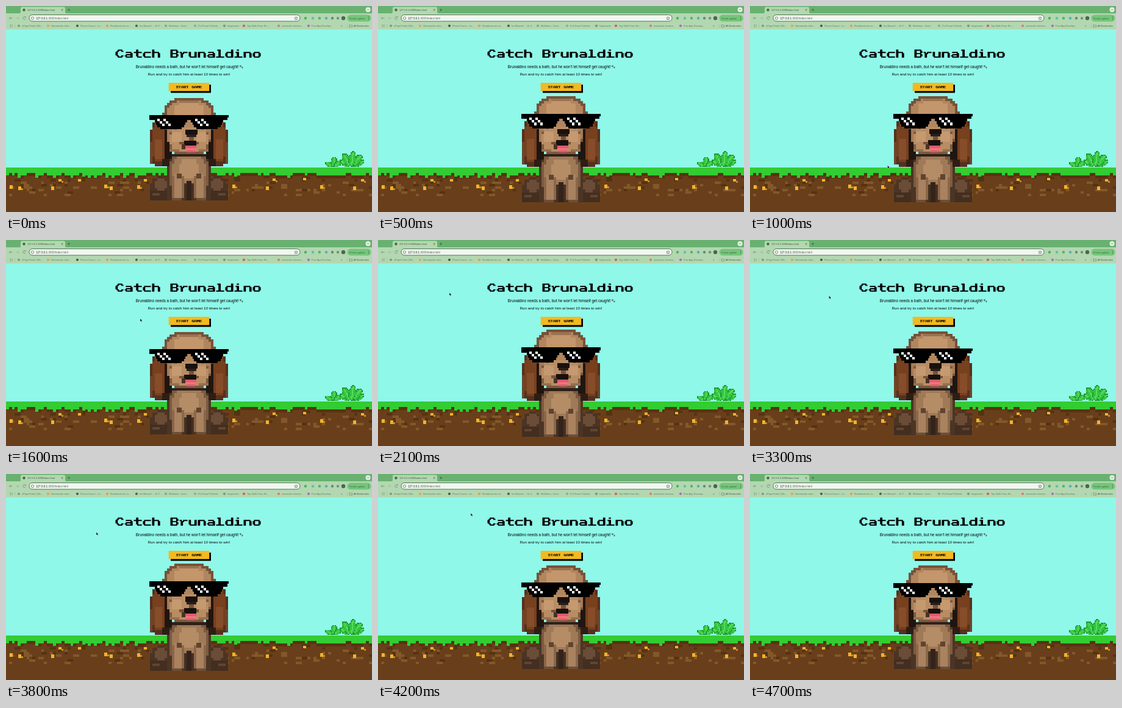
Write an HTML page that moves like this. It is 600 px wide and 338 px high and loops after 4800 ms.

```html
<!DOCTYPE html>
<html lang="en">
<head>
<meta charset="utf-8">
<title>Catch Brunaldino</title>
<style>
  html, body { margin: 0; width: 100%; height: 100%; overflow: hidden; background: #8ff8e9; }
  svg { display: block; width: 600px; height: 338px; }
  text { font-family: "Liberation Sans", Arial, sans-serif; }
  .px { shape-rendering: crispEdges; }
  .letters { fill: none; stroke: #000; stroke-width: 1; stroke-linecap: square; stroke-linejoin: miter; }
</style>
</head>
<body>
<svg id="stage" viewBox="0 0 600 338">
  <rect width="600" height="338" fill="#8ff8e9"/>

  <g id="chrome">
    <rect width="600" height="13" fill="#68b170"/>
    <rect y="12" width="600" height="26.5" fill="#b3d7b0"/>
    <path d="M21 12.5q3 0 3-3V4q0-2.5 2.5-2.5h68q2.5 0 2.5 2.5v5.5q0 3 3 3z" fill="#b3d7b0"/>
    <circle cx="29.5" cy="6.5" r="2.2" fill="#456b49"/>
    <text x="35" y="8" font-size="3.9" fill="#34503a">127.0.0.1:3000/index.html</text>
    <path d="M90.700 5l2.800 2.800m0-2.800l-2.800 2.800M101 6.400h4m-2-2v4" stroke="#29482b" stroke-width=".6"/>
    <circle cx="593.5" cy="6" r="4" fill="#e4f1e2"/>
    <path d="M592 5.300l1.500 1.500 1.500-1.500" fill="none" stroke="#2f4f33" stroke-width=".7"/>
    <g fill="none" stroke="#66886b" stroke-width=".7">
      <path d="M10.500 20H5.500m2-2l-2 2 2 2"/>
      <path d="M16 20h5m-2-2l2 2-2 2" stroke="#92b594"/>
      <path d="M32 18.500a2.300 2.300 0 1 0 .2 2.300M32.200 17v1.700h-1.700"/>
    </g>
    <rect x="38" y="14.500" width="444" height="10.500" rx="5.200" fill="#f0f7ee" stroke="#41694a" stroke-width=".9"/>
    <circle cx="43.500" cy="20" r="2.200" fill="none" stroke="#4d6550" stroke-width=".7"/>
    <text x="49" y="21.600" font-size="4.600" fill="#1b2b1c">127.0.0.1<tspan fill="#566b58">:3000/index.html</tspan></text>
    <path d="M475.500 17.500l.8 1.700 1.900.2-1.400 1.300.4 1.900-1.700-1-1.700 1 .4-1.900-1.400-1.300 1.900-.2z" fill="none" stroke="#364d38" stroke-width=".6"/>
    <rect x="559.500" y="14.500" width="39" height="11" rx="5.500" fill="#75c47b"/>
    <text x="563" y="21.500" font-size="4.200" fill="#2f7038">Finish update</text>
    <path d="M594.500 17.800v.1m0 2.100v.1m0 2.100v.1" stroke="#1e5427" stroke-linecap="round"/>
    <path d="M6.500 30.500h1.500v1.500h-1.500zm2.500 0h1.500v1.500h-1.500zm-2.500 2.500h1.500v1.500h-1.500zm2.500 0h1.500v1.500h-1.500z" fill="#7d9f80"/>
    <path d="M14.500 29.500v6M559.500 29.500v6" stroke="#8fb891" stroke-width=".5"/>
    <text x="549" y="34" font-size="5" fill="#5c7c60">»</text>
    <text x="570" y="34" font-size="3.900" fill="#3c5a41">All Bookmarks</text>
    <path d="M563 30.800h1.800l.7.8h2.300v3H563z" fill="none" stroke="#5c7c60" stroke-width=".6"/>
  </g>

  <g id="ground" class="px"></g>
  <g id="bushes" class="px"></g>

  <text x="300" y="84" font-size="15" text-anchor="middle" fill="none">Catch Brunaldino</text>
  <g id="title" class="letters"></g>

  <text x="381.600" y="101.600" font-size="6.300" text-anchor="end">Brunaldino needs a bath, but he won’t let himself get caught!</text>
  <g id="paws" fill="#3d4a4b"></g>
  <text x="300" y="114.200" font-size="6.250" text-anchor="middle">Run and try to catch him at least 10 times to win!</text>

  <path d="M270 129h66v13.500h-66z"/>
  <rect x="266.700" y="126" width="66.600" height="13.600" fill="#f4b91f"/>
  <text x="300" y="135" font-size="4.200" text-anchor="middle" fill="none">START GAME</text>
  <g id="start" class="letters"></g>

  <g id="dog" class="px"></g>
  <path id="cursor" d="M0 0v4.800l1.200-1 .8 1.800.9-.4-.8-1.700h1.500z" stroke="#dff" stroke-width=".35"/>
</svg>

<script>
const $ = id => document.getElementById(id);

function add(parent, tag, attrs, text) {
  const el = document.createElementNS("http://www.w3.org/2000/svg", tag);
  for (const k in attrs) el.setAttribute(k, attrs[k]);
  if (text) el.textContent = text;
  parent.append(el);
  return el;
}
const rect = (g, x, y, width, height, fill) => add(g, "rect", { x, y, width, height, fill });

function seeded(seed) {
  return () => (seed = (seed * 16807) % 2147483647) / 2147483647;
}

// Pixel letters: pen strokes two cells wide and one cell high
const strokes = {
  A: "M1 0h.5M.5 1h0M2 1h0M0 2v4M2.5 2v4M0 4h2.5",
  B: "M0 0v6M0 0h2M2.5 1v1M0 3h2M2.5 4v1M0 6h2",
  C: "M1 0h1M.5 1h0M2.5 1h0M0 2v2M.5 5h0M2.5 5h0M1 6h1",
  E: "M0 0h2.5M0 0v6M0 3h2M0 6h2.5",
  G: "M1 0h1.5M.5 1h0M0 2v2M1.5 3h1M2.5 3v3M.5 5h0M1 6h1.5",
  M: "M0 0v6M2.5 0v6M.5 1h0M2 1h0M0 2h2.5M1.25 3h0",
  R: "M0 0v6M0 0h2M2.5 1v1M2 3h.5M0 4h1.5M1.5 5h0M2 6h.5",
  S: "M.5 0h1.5M0 1v1M2.5 1h0M.5 3h1.5M2.5 4v1M0 5h0M.5 6h1.5",
  T: "M0 0h2M1 0v6",
  a: "M.5 2h1.5M2.5 3v3M.5 4h2M0 5h0M.5 6h2",
  c: "M.5 2h2M0 3v2M.5 6h2",
  d: "M2.5 0v6M.5 2h2M0 3v2M.5 6h2",
  h: "M0 0v6M0 2h2M2.5 3v3",
  i: "M1 0h0M.5 2h.5M1 2v4M0 6h2.5",
  l: "M.5 0h.5M1 0v6M0 6h2.5",
  n: "M0 2v4M0 2h2M2.5 3v3",
  o: "M.5 2h1.5M0 3v2M2.5 3v2M.5 6h1.5",
  r: "M0 2h0M.5 3v3M1 3h0M1.5 2h1",
  t: "M1 0v5M0 2h2.5M1.5 6h1",
  u: "M0 2v3M2.5 2v4M.5 6h2"
};

function letter(g, text, x, y, size) {
  const c = size / 8;
  [...text].forEach((ch, i) => {
    if (strokes[ch]) add(g, "path", {
      d: strokes[ch],
      transform: `translate(${x + i * size + c} ${y + c / 2}) scale(${2 * c} ${c})`
    });
  });
}
letter($("title"), "Catch Brunaldino", 179.5, 71.5, 15);
letter($("start"), "START GAME", 279, 131, 4.25);

function paw(x, y, s) {
  const g = add($("paws"), "g", { transform: `translate(${x} ${y}) rotate(-20) scale(${s})` });
  add(g, "ellipse", { cx: 0, cy: .7, rx: 1.2, ry: .9 });
  for (const dx of [-1.2, -.4, .4, 1.2])
    add(g, "circle", { cx: dx, cy: Math.abs(dx) > 1 ? -.4 : -1, r: .4 });
}
paw(384.3, 98.5, 1);
paw(387.3, 100.7, .9);

function browserBits() {
  const g = $("chrome");
  const marks = [
    [21, "oPaperTrails | Wa...", "#7d9f80"], [69, "Información sobr...", "#e3a550"],
    [117, "Pluma Course - Le...", "#4c5b51"], [166, "Residencia de ca...", "#e69a56"],
    [214, "Ivo Marend → Sr. F...", "#4f6252"], [262, "Mobiliario - Gent...", "#86a688"],
    [310, "Pol Tenuri Portfolio", "#8fac91"], [358, "Inspiración", "#77977b"],
    [390, "Top Skills From Re...", "#d85a52"], [447, "sensación termina...", "#de7a6c"],
    [496, "Free App Develop...", "#a56cc4"]
  ];
  for (const [x, label, fill] of marks) {
    add(g, "circle", { cx: x, cy: 32.5, r: 2.1, fill });
    add(g, "text", { x: x + 5, y: 33.9, "font-size": 3.9, fill: "#587a5d" }, label);
  }
  const tools = [[491, "#48b45e"], [503, "#5cc3a6"], [514, "#4cb868"], [525, "#57aebc"], [535, "#6b8a6e"], [544, "#75947a"], [553, "#476750"]];
  for (const [cx, fill] of tools) add(g, "circle", { cx, cy: 20, r: cx === 553 ? 3.2 : 2.2, fill });
}
browserBits();

function ground() {
  const g = $("ground"), rnd = seeded(4127), c = 4.8;
  const pick = n => Math.floor(rnd() * n);
  rect(g, 0, 265, 600, 73, "#693f1b");
  for (let i = 0; i < 125; i += 2) {
    const depth = 9 + 4 * pick(2);
    rect(g, i * c, 265, c * 2, depth + 5, "#573411");
    rect(g, i * c, 265, c * 2, depth, "#33cc33");
    rect(g, i * c, 265, c, depth + 4 * pick(2), "#33cc33");
  }
  for (let i = 0; i < 120; i++) {
    const light = rnd() < .55;
    rect(g, pick(125) * c, (light ? 288 : 280) + 4 * pick(light ? 6 : 7), c * (1 + pick(2)), 4, light ? "#83582a" : "#553211");
  }
  const gold = [[6, 294], [20, 296], [74, 296], [86, 284], [118, 284], [161, 293], [170, 296], [215, 294],
    [226, 284], [371, 293], [426, 296], [437, 283], [487, 282], [515, 294], [569, 296], [582, 284]];
  gold.forEach(([x, y], i) => {
    rect(g, x, y, 5, y > 290 ? 6 : 4, "#f0b429");
    if (i % 2) rect(g, x + 5, y + 3, 3, 3, "#c98a20");
  });
}
ground();

function bushes() {
  const g = $("bushes");
  // Leaf: base point, length, half width, angle in degrees
  const leaves = [[536, 264, 17, 5, -80], [535, 263, 13, 4, -150], [538, 263, 14, 4.5, -35],
    [564, 263, 19, 5, -150], [570, 262, 19, 5, -25], [564, 263, 24, 6, -118], [568, 263, 24, 6, -52], [566, 264, 26, 6, -82]];
  for (let y = 238; y < 265; y += 2) for (let x = 523; x < 588; x += 2) {
    let fill = "";
    for (const [bx, by, len, w, deg] of leaves) {
      const a = deg * Math.PI / 180, dx = x + 1 - bx, dy = y + 1 - by;
      const u = (dx * Math.cos(a) + dy * Math.sin(a)) / len * 2 - 1;
      const v = (dy * Math.cos(a) - dx * Math.sin(a)) / w;
      const d = u * u + v * v;
      if (d < 1) fill = d > .74 ? "#1f9630" : Math.abs(v) < .2 ? "#55dc58" : "#32c440";
    }
    if (fill) rect(g, x, y, 2, 2, fill);
  }
}
bushes();

// Dog on a grid of 4 px cells
function dog() {
  const g = $("dog"), c = 4;
  const box = (x, y, w, h, fill) => rect(g, 236 + x * c, 151 + y * c, w * c, h * c, fill);
  const pair = (x, y, w, h, fill) => { box(x, y, w, h, fill); box(32 - x - w, y, w, h, fill); };
  // Superellipse in rows; a larger n is squarer
  function blob(cx, cy, rx, ry, fill, n = 2) {
    for (let y = Math.ceil(cy - ry - .5); y + .5 <= cy + ry; y++) {
      const half = rx * (1 - Math.abs((y + .5 - cy) / ry) ** n) ** (1 / n);
      const l = Math.round(cx - half), r = Math.round(cx + half);
      if (r > l) box(l, y, r - l, 1, fill);
    }
  }
  const twins = (cx, cy, rx, ry, fill, n) => { blob(cx, cy, rx, ry, fill, n); blob(32 - cx, cy, rx, ry, fill, n); };

  // haunches
  twins(4.5, 37, 4.4, 5, "#4b3424");
  twins(4.5, 35.5, 2.6, 2.6, "#6a4c37");
  pair(0, 38, 7, 4, "#432e20");
  pair(1, 39, 3, 1, "#614531");

  // chest and front legs
  box(7, 24, 18, 18, "#4b3525");
  blob(16, 31, 8.4, 8, "#7b5b41", 3);
  blob(16, 30, 7, 6.5, "#a07a57", 2.6);
  blob(16, 29, 4, 4.5, "#b48c65");
  pair(9, 32, 5, 9, "#8b6749");
  pair(10, 31, 3, 10, "#a98260");
  pair(11, 31, 2, 2, "#5f432e");
  box(14, 35, 4, 7, "#443022");
  box(15, 34, 2, 8, "#33231a");
  pair(9, 41, 4, 1, "#6d4f38");

  // ears
  twins(4.6, 18.5, 4.3, 9.5, "#56301d", 3.2);
  twins(4.4, 18, 3.4, 8.5, "#77401f", 3);
  twins(3.6, 21, 1.8, 4.5, "#864d2b");
  pair(0, 18, 1, 9, "#6b452d");
  pair(6, 13, 3, 12, "#20150f");
  pair(5, 25, 3, 3, "#2f1d13");

  // head
  blob(16, 8, 10.6, 8.2, "#765239", 2.5);
  blob(16, 8.6, 9.6, 7.7, "#b1865f", 2.5);
  blob(16, 5, 6.5, 3, "#c3966c", 2.5);
  box(12, 1, 8, 1, "#9b7350");
  box(7, 12, 18, 6, "#a67b57");
  blob(16, 17.5, 8.5, 5.7, "#7c593e", 3);
  blob(16, 17, 7.6, 5, "#b98d64", 3);
  pair(9, 14, 4, 4, "#c69a70");
  pair(8, 21, 4, 1, "#96704f");
  box(9, 23, 14, 1, "#2e2018");

  // nose and mouth
  box(14.5, 13, 5, 2, "#18110f");
  box(15, 15, 4, 1, "#2b1e18");
  box(16, 16, 2, 1.5, "#765338");
  pair(12, 18, 2.5, 1, "#765338");
  box(14, 17.5, 5, 2, "#18100e");
  box(13, 19, 1.5, 2, "#4a3124");
  box(14.5, 19.5, 4.5, 1, "#d85d6c");
  box(14.5, 20.5, 4.5, 1, "#f4707f");
  box(15, 21.5, 3.5, .8, "#d85d6c");

  // sunglasses
  box(-.2, 7, 32.4, 1, "#000");
  box(-.2, 8, 32, 1, "#000");
  pair(2, 9, 13.2, 1, "#000");
  pair(2.5, 10, 12, 1, "#000");
  pair(3, 11, 11, 1, "#000");
  pair(4.3, 12, 8.7, .8, "#000");
  for (const x of [3, 5.5, 18.5, 21])
    for (let k = 0; k < 3; k++) box(x + k, 8.5 + k, 1, 1, "#fff");
}
dog();

const LOOP = 4800, BREATH = 1500;
// time, x, y
const path = [[650, 234, 340], [1000, 225.5, 261.5], [1600, 220, 129], [2100, 117, 86.5],
  [2700, 105, 86.5], [3800, 148, 95.5], [4100, 150, 90], [4400, 158, -8]];

function cursorAt(t) {
  const n = path.findIndex(p => p[0] > t);
  if (n < 1) return [-20, -20];
  const [t0, x0, y0] = path[n - 1], [t1, x1, y1] = path[n];
  const u = (t - t0) / (t1 - t0), e = u * u * (3 - 2 * u);
  return [x0 + (x1 - x0) * e, y0 + (y1 - y0) * e];
}

const began = performance.now();
function draw() {
  const t = (performance.now() - began) % LOOP;
  const grow = 1 + .025 * (1 - Math.cos(2 * Math.PI * t / BREATH));
  $("dog").setAttribute("transform", `translate(0 235) scale(1 ${grow}) translate(0 -235)`);
  $("cursor").setAttribute("transform", `translate(${cursorAt(t)})`);
  requestAnimationFrame(draw);
}
draw();
</script>
</body>
</html>
```
